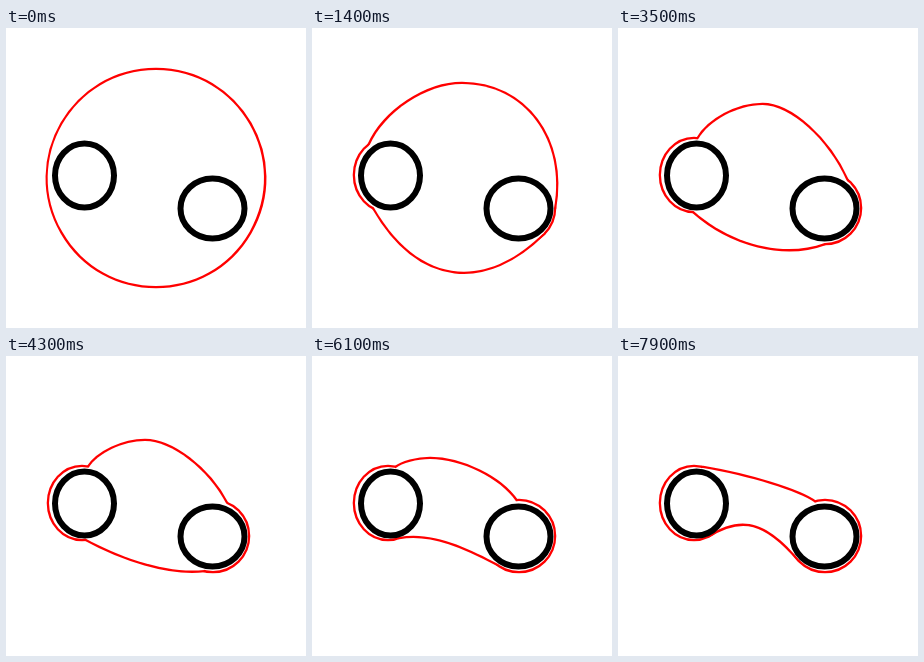
An HTML page with a canvas for the animation above (8 s loop, 300 px wide and 300 px high).

```html
<!DOCTYPE html>
<html lang="en">
<head>
<meta charset="utf-8">
<title>Shrinking contour</title>
<style>
  html, body { margin: 0; width: 100%; height: 100%; overflow: hidden; background: #fff; }
  canvas { display: block; }
</style>
</head>
<body>
<canvas id="stage" width="300" height="300"></canvas>
<script>
const ctx = document.getElementById('stage').getContext('2d');
const LAST = 79;    // steps of 100 ms, counted from 0
const TOUCH = 14;   // step at which the circle has reached both rings

const lerp = (a, b, u) => a + (b - a) * u;
const mix = (p, q, u) => [lerp(p[0], q[0], u), lerp(p[1], q[1], u)];
const easeOut = (u, power) => 1 - (1 - u) ** power;

// Ellipses on which the contour comes to rest around each ring.
const leftRest = { x: 76, y: 147, rx: 33, ry: 36 };
const rightRest = { x: 207, y: 180, rx: 35, ry: 35 };

function onEllipse(e, degrees) {
  const a = degrees * Math.PI / 180;
  return [e.x + e.rx * Math.cos(a), e.y + e.ry * Math.sin(a)];
}

// Both poses list the same points: left end, top, right end (with handles
// between them), then the lower curve from right to left.

// A circle made of three arcs of 120 degrees.
function circlePose() {
  const r = 108, h = r * 4 / 3 * Math.tan(Math.PI / 6);
  const circle = { x: 150, y: 150, rx: r, ry: r };
  const handle = (deg, side) => {
    const p = onEllipse(circle, deg), a = deg * Math.PI / 180;
    return [p[0] - side * h * Math.sin(a), p[1] + side * h * Math.cos(a)];
  };
  const left = onEllipse(circle, 150), right = onEllipse(circle, 30);
  return [
    left, handle(150, 1), handle(270, -1),
    onEllipse(circle, 270), handle(270, 1), handle(30, -1), right,
    right, handle(30, 1), handle(150, -1), left
  ];
}

// The band between the rings, u from first touch to the end.
function bandPose(u) {
  const slide = easeOut(u, 1.7);
  const left = onEllipse(leftRest, lerp(-124, -76, easeOut(u, 5)));
  const right = onEllipse(rightRest, lerp(0, -107, slide));
  const top = [150 - 65 * u ** 2.2, Math.min(56 + 65 * u, 112)];

  // Corners pull the two upper arcs outwards; the right one sags at the end.
  const reach = 0.45 + 0.3 * u + 0.79 * (1 - u) ** 7;
  const leftCorner = [lerp(top[0], left[0], 0.7), top[1]];
  const rightCorner = [lerp(top[0], right[0], reach), top[1] + 14 * u ** 12];

  return [
    left, mix(left, leftCorner, 0.55), mix(top, leftCorner, 0.55),
    top, mix(top, rightCorner, 0.55), mix(right, rightCorner, 0.55), right,
    onEllipse(rightRest, lerp(46, 138, slide)),
    [lerp(175, 148, u), lerp(261, 165, u)],
    [lerp(108, 124, u), lerp(259, 158, easeOut(u, 1.4))],
    onEllipse(leftRest, lerp(115, 65, slide))
  ];
}

function bodyAt(step) {
  const pts = step < TOUCH
    ? circlePose().map((p, i) => mix(p, bandPose(0)[i], step / TOUCH))
    : bandPose((step - TOUCH) / (LAST - TOUCH));
  const path = new Path2D();
  const curve = i => path.bezierCurveTo(...pts[i], ...pts[i + 1], ...pts[i + 2]);
  path.moveTo(...pts[0]);
  curve(1);
  curve(4);
  path.lineTo(...pts[7]);
  curve(8);
  path.closePath();
  return path;
}

function ellipse(x, y, rx, ry) {
  const path = new Path2D();
  path.ellipse(x, y, rx, ry, 0, 0, 2 * Math.PI);
  return path;
}

const rests = [leftRest, rightRest].map(e => ellipse(e.x, e.y, e.rx, e.ry));
const rings = [ellipse(78.5, 147.5, 29.5, 32), ellipse(206.5, 180.5, 32, 30)];

function draw(step) {
  ctx.fillStyle = '#fff';
  ctx.fillRect(0, 0, 300, 300);

  // Filling over the strokes leaves only the outline of the union.
  const shapes = [...rests, bodyAt(step)];
  ctx.lineJoin = 'round';
  ctx.lineWidth = 4.6;
  ctx.strokeStyle = '#f00';
  shapes.forEach(s => ctx.stroke(s));
  shapes.forEach(s => ctx.fill(s));

  ctx.lineWidth = 6;
  ctx.strokeStyle = '#000';
  rings.forEach(r => ctx.stroke(r));
}

function tick() {
  draw(Math.floor(performance.now() % 8000 / 100));
  requestAnimationFrame(tick);
}
tick();
</script>
</body>
</html>
```
